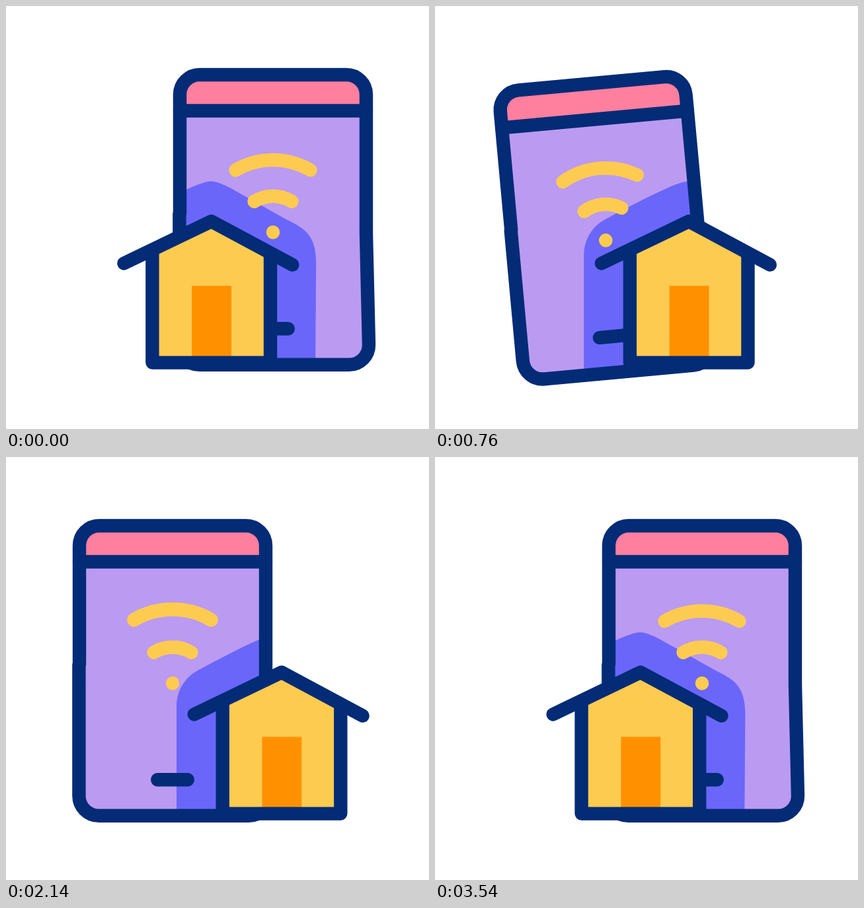
Write an HTML page with a canvas that moves like this. It is 640 by 640 pixels and loops after 3600 ms.

```html
<!DOCTYPE html>
<html lang="en">
<head>
<meta charset="utf-8">
<title>Smart home</title>
<style>
html, body { margin: 0; width: 100%; height: 100%; overflow: hidden; background: #fff; }
canvas { display: block; width: 640px; height: 640px; }
</style>
</head>
<body>
<canvas id="stage" width="640" height="640"></canvas>
<script>
const ctx = document.getElementById('stage').getContext('2d');
const LOOP = 3600;
const NAVY = '#032b76', PINK = '#ff7f9f', LILAC = '#bb9af2', BLUE = '#6a66fa',
      YELLOW = '#fdcb50', ORANGE = '#ff9100';
const LINE = 20.4;
const PHONE = { right: 404, left: 252, y: 323 };
const HOUSE = { left: 310.7, right: 417 };
const PIVOT = { x: 130, y: 100 };

const clamp = v => Math.min(1, Math.max(0, v));
const mix = (a, b, k) => a + (b - a) * k;
const smooth = u => u * u * (3 - 2 * u);
const span = (t, from, to) => clamp((t - from) / (to - from));

// Timing curve with control points (x1, 0) and (x2, 1)
function ease(u, x1, x2) {
  if (u <= 0 || u >= 1) return clamp(u);
  let lo = 0, hi = 1;
  for (let i = 0; i < 26; i++) {
    const s = (lo + hi) / 2, r = 1 - s;
    if (3 * x1 * s * r * r + 3 * x2 * s * s * r + s * s * s < u) lo = s; else hi = s;
  }
  return smooth(lo);
}

// Rises from 0 to 1 and falls back
function pulse(t, from, to) {
  return smooth(1 - Math.abs(2 * span(t, from, to) - 1));
}

const swings = [[0, 0], [130, 0], [440, 3.25], [840, -6.2], [1260, 0], [LOOP, 0]];
function tilt(t) {
  const i = swings.findIndex(k => t < k[0]);
  const [t0, a] = swings[i - 1], [t1, b] = swings[i];
  return mix(a, b, smooth(span(t, t0, t1))) * Math.PI / 180;
}

function stroke(color, width = LINE) {
  ctx.strokeStyle = color;
  ctx.lineWidth = width;
  ctx.stroke();
}

function line(color, ...pts) {
  ctx.beginPath();
  pts.forEach(([x, y]) => ctx.lineTo(x, y));
  stroke(color);
}

// Arc through both ends of a chord, risen by h at the middle
function arch(half, top, h) {
  const r = (half * half + h * h) / (2 * h), a = Math.asin(half / r);
  ctx.beginPath();
  ctx.arc(0, top + r, r, -Math.PI / 2 - a, -Math.PI / 2 + a);
  stroke(YELLOW);
}

function phonePath() {
  const x = 141, top = -219, low = 219.8, r = 30;
  ctx.beginPath();
  ctx.moveTo(-x, -9);
  ctx.arcTo(-x, top, x, top, r);
  ctx.arcTo(x, top, x, low, r);
  ctx.lineTo(x, 22);
  ctx.lineTo(x + 4, low - r);
  ctx.arcTo(x + 4.6, low, 0, low, r);
  ctx.arcTo(-x - 0.6, low, -x - 0.6, 0, r);
  ctx.lineTo(-x - 0.6, -9);
  ctx.closePath();
}

function shadow(cx) {
  ctx.save();
  ctx.translate(cx, 0);
  ctx.beginPath();
  ctx.moveTo(-159, 600);
  ctx.lineTo(-159, 378);
  ctx.bezierCurveTo(-159, 354, -147, 334, -127, 323);
  ctx.bezierCurveTo(-96, 306, -65, 290, -34, 276);
  ctx.bezierCurveTo(-21, 270, -8, 265.2, 0, 265.2);
  ctx.bezierCurveTo(8, 265.2, 20, 271, 28, 275);
  ctx.lineTo(110, 321);
  ctx.bezierCurveTo(138, 336, 158.5, 342, 158.5, 390);
  ctx.lineTo(157, 600);
  ctx.fillStyle = BLUE;
  ctx.fill();
  ctx.restore();
}

function placePhone(x, angle) {
  ctx.translate(x + PIVOT.x, PHONE.y + PIVOT.y);
  ctx.rotate(angle);
  ctx.translate(-PIVOT.x, -PIVOT.y);
}

function wifi(t) {
  ctx.save();
  const s = 1 + 0.26 * pulse(t, 1455, 2228), base = -18;
  ctx.translate(0, base);
  ctx.scale(s, s);
  ctx.translate(0, -base);
  arch(56.5, -90, 15.3);
  ctx.restore();
  arch(28.5, -35.2, 8);
  ctx.beginPath();
  ctx.arc(0, 19.4 + 8 * pulse(t, 1400, 1900), 10.3, 0, 7);
  ctx.fillStyle = YELLOW;
  ctx.fill();
}

function phone(t, x, houseX) {
  const angle = tilt(t);
  ctx.save();
  placePhone(x, angle);
  phonePath();
  ctx.save();
  ctx.clip();
  ctx.fillStyle = LILAC;
  ctx.fillRect(-160, -240, 320, 480);
  ctx.fillStyle = PINK;
  ctx.fillRect(-160, -240, 320, 75);
  ctx.setTransform(1, 0, 0, 1, 0, 0);
  shadow(houseX);
  ctx.restore();
  wifi(t);
  line(NAVY, [-22.8, 165.2], [22.8, 165.2]);
  line(NAVY, [-141, -164.5], [141, -164.5]);
  phonePath();
  stroke(NAVY);
  ctx.restore();
}

function house(cx) {
  const w = 89.3, low = 539.6;
  ctx.save();
  ctx.translate(cx, 0);
  ctx.beginPath();
  [[-w, low], [-w, 369], [0, 326], [w, 373], [w, low]].forEach(p => ctx.lineTo(...p));
  ctx.fillStyle = YELLOW;
  ctx.fill();
  ctx.fillStyle = ORANGE;
  ctx.fillRect(-29.5, 423.4, 59.8, 110);
  line(NAVY, [-w, 371], [-w, low], [w, low], [w, 375]);
  line(NAVY, [-132.3, 389.4], [0, 325.7], [122.6, 391.6]);
  ctx.restore();
}

function draw(now) {
  const t = now % LOOP;
  const back = t >= 2400;
  const phoneK = back ? 1 - ease(span(t, 2506, 3486), 0.667, 0.333)
                      : ease(span(t, 80, 1080), 1, 0.14);
  const houseK = back ? 1 - ease(span(t, 2400, 3600), 0.667, 0.333)
                      : ease(span(t, 80, 1320), 0.9, 0.15);
  const houseX = mix(HOUSE.left, HOUSE.right, houseK);
  ctx.fillStyle = '#fff';
  ctx.fillRect(0, 0, 640, 640);
  ctx.lineCap = ctx.lineJoin = 'round';
  phone(t, mix(PHONE.right, PHONE.left, phoneK), houseX);
  house(houseX);
}

const start = performance.now();
function tick() {
  draw(performance.now() - start);
  requestAnimationFrame(tick);
}
tick();
</script>
</body>
</html>
```
